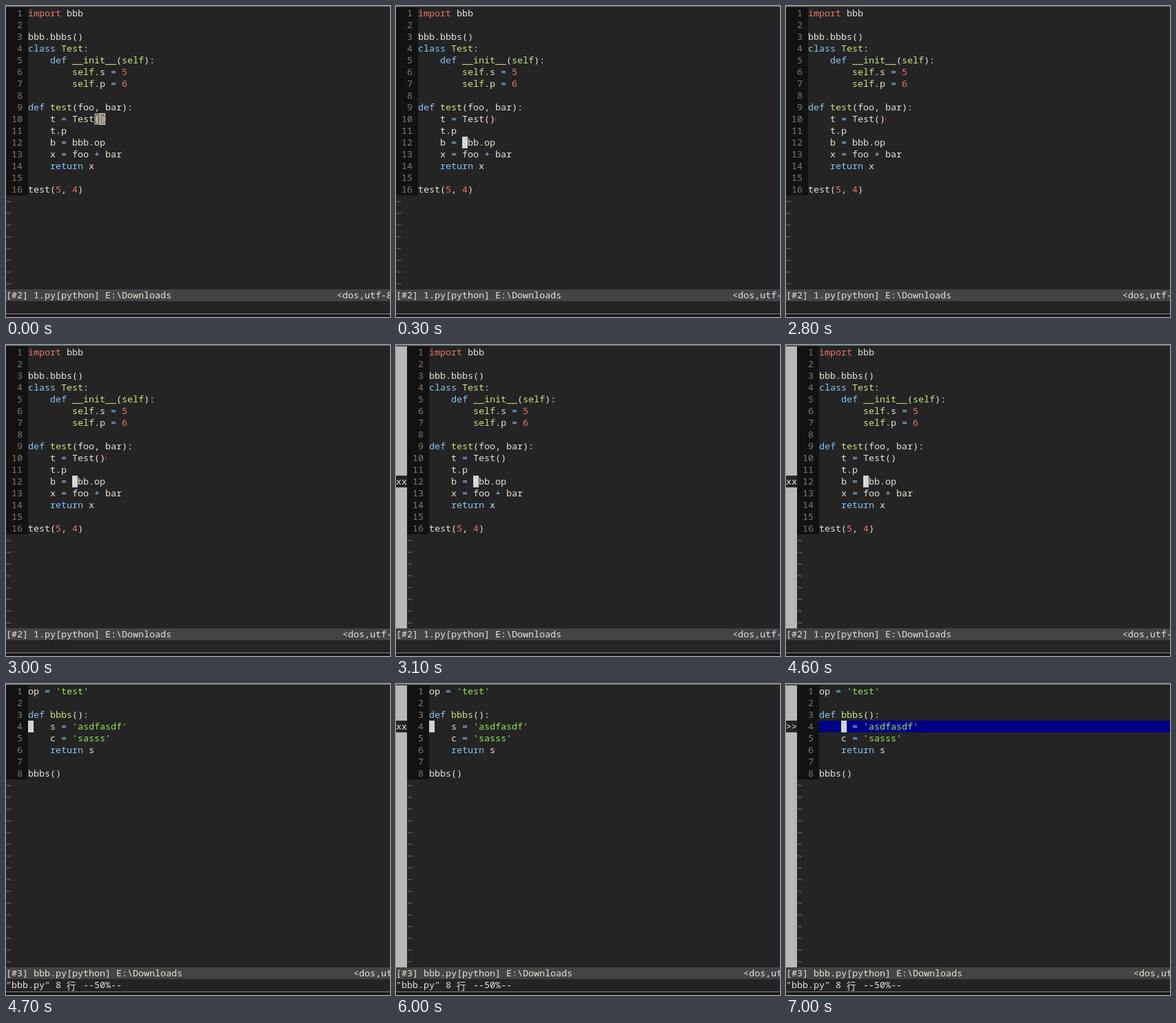
Recreate the animation shown at these times as an HTML page. Size 557x450 px, loop 8 s.

```html
<!DOCTYPE html>
<html lang="en">
<head>
<meta charset="utf-8">
<title>Editor session</title>
<style>
html, body { margin: 0; width: 100%; height: 100%; overflow: hidden; background: #242424; }
svg { display: block; }
text { white-space: pre; font-family: "Noto Sans Mono", "Noto Sans Mono CJK SC", monospace; }
</style>
</head>
<body>
<svg id="stage" width="557" height="450" viewBox="0 0 557 450"></svg>
<script>
const CELL = 8, ROW = 17, TOP = 2, LOOP = 8000;
const FONT = '"Noto Sans Mono", "Noto Sans Mono CJK SC", monospace';
const C = {
  bg: '#242424', gutter: '#121212', number: '#857b6f', text: '#e8e5db',
  keyword: '#8ac6f2', name: '#cae682', value: '#e5786d', string: '#95e454',
  tilde: '#808080', bar: '#444444', sign: '#b8b8b8', cursor: '#d2d2d2',
  current: '#000087', match: '#857b6f'
};

const mainFile = `import bbb

bbb.bbbs()
class Test:
    def __init__(self):
        self.s = 5
        self.p = 6

def test(foo, bar):
    t = Test()
    t.p
    b = bbb.op
    x = foo + bar
    return x

test(5, 4)`.split('\n');

const moduleFile = `op = 'test'

def bbbs():
    s = 'asdfasdf'
    c = 'sasss'
    return s

bbbs()`.split('\n');

const first = { lines: mainFile, status: '[#2] 1.py[python] E:\\Downloads', info: 488 };
const second = { lines: moduleFile, status: '[#3] bbb.py[python] E:\\Downloads', info: 504, message: true };
const marked = { ...first, sign: 'xx', signRow: 11 };
const markedOn = { ...marked, cursor: [11, 8] };

// Each scene holds from its start time until the next one.
const scenes = [
  [0, { ...first, info: 480, match: true }],
  [300, { ...first, cursor: [11, 8], speck: true }],
  [2800, { ...first, speck: true }],
  [3000, { ...first, cursor: [11, 8], speck: true }],
  [3100, markedOn],
  [3700, marked],
  [3900, markedOn],
  [4300, marked],
  [4600, markedOn],
  [4700, { ...second, cursor: [3, 0] }],
  [6000, { ...second, cursor: [3, 0], sign: 'xx', signRow: 3 }],
  [7000, { ...second, cursor: [3, 4], sign: '>>', signRow: 3, current: true }]
];

// Pick the size at which one character fills one cell.
const pen = document.createElement('canvas').getContext('2d');
pen.font = `100px ${FONT}`;
const fontSize = CELL * 100 / pen.measureText('0').width;

const rowY = row => TOP + row * ROW;
const escape = s => s.replace(/&/g, '&amp;').replace(/</g, '&lt;').replace(/>/g, '&gt;');
const rect = (x, y, w, h, fill) =>
  `<rect x="${x}" y="${y}" width="${w}" height="${h}" fill="${fill}"/>`;
const label = (x, row, s, fill = C.text, base = 13) =>
  `<text x="${x}" y="${rowY(row) + base}" font-size="${fontSize}" fill="${fill}">${escape(s)}</text>`;

const tokenPattern = /'[^']*'|\w+|[=+]|[^\w\s=+']+/g;

function tokenColor(token, before) {
  if (token[0] === "'") return C.string;
  if (token === 'import' || /^\d+$/.test(token)) return C.value;
  if (/^(class|def|return|[=+])$/.test(token)) return C.keyword;
  if (token === 'self' || /\b(def|class) $/.test(before)) return C.name;
  return C.text;
}

function codeLine(line, x, row) {
  return [...line.matchAll(tokenPattern)].map(m =>
    label(x + m.index * CELL, row, m[0], tokenColor(m[0], line.slice(0, m.index)))
  ).join('');
}

function draw(s) {
  const left = s.sign ? 16 : 0, codeX = left + 32, count = s.lines.length;
  let out = rect(0, 0, 557, 450, C.bg) + rect(0, 0, 557, 1, '#777777');
  out += rect(left, TOP, 32, count * ROW, C.gutter);

  if (s.sign) {
    out += rect(0, TOP, 16, 24 * ROW, C.sign);
    out += rect(0, rowY(s.signRow), 16, ROW, C.bg);
    out += label(0, s.signRow, s.sign);
  }
  if (s.current) out += rect(codeX, rowY(s.signRow), 557 - codeX, ROW, C.current);
  if (s.cursor) {
    const [row, col] = s.cursor;
    out += rect(codeX + col * CELL, rowY(row), CELL, ROW, C.cursor);
  }
  if (s.match) {
    // Matching pair with the hollow cursor of an unfocused window.
    out += rect(128, rowY(9), 2 * CELL, ROW, C.match);
    out += `<rect x="136.5" y="${rowY(9) + 0.5}" width="${CELL - 1}" height="${ROW - 1}" fill="none" stroke="${C.cursor}"/>`;
  }

  s.lines.forEach((line, row) => {
    const n = String(row + 1);
    out += label(left + 24 - n.length * CELL, row, n, C.number);
    out += codeLine(line, codeX, row);
  });
  for (let row = count; row < 24; row++) out += label(left, row, '~', C.tilde, 14);

  if (s.match || s.speck) out += rect(144, 161, 1, 5, '#e02020');

  out += rect(0, rowY(24), 557, ROW, C.bar);
  out += label(0, 24, s.status) + label(s.info, 24, '<dos,utf-8');
  if (s.message) {
    out += label(0, 25, '"bbb.py" 8') + label(88, 25, '行', C.text, 15) + label(112, 25, '--50%--');
  }
  return out + rect(0, 445, 557, 1, '#888888') + rect(0, 446, 557, 4, '#161616');
}

const stage = document.getElementById('stage');
const start = performance.now();
let shown;

function update() {
  const t = (performance.now() - start) % LOOP;
  const scene = scenes.findLast(([from]) => t >= from)[1];
  if (scene !== shown) {
    stage.innerHTML = draw(scene);
    shown = scene;
  }
  requestAnimationFrame(update);
}
update();
</script>
</body>
</html>
```
